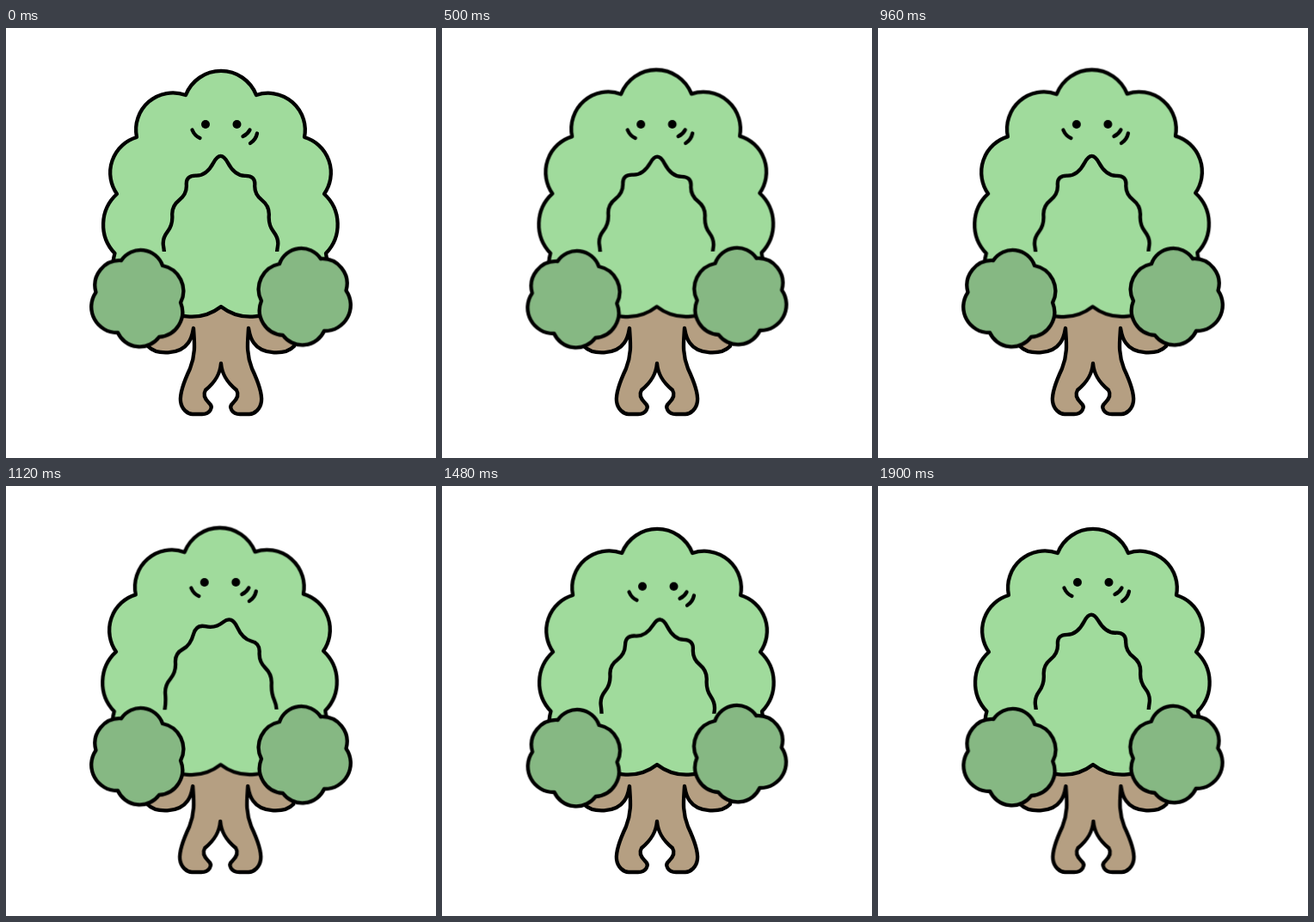
An HTML page without scripts for the animation above (1.92 s loop, 500x500 px).

```html
<!DOCTYPE html>
<html lang="en">
<head>
<meta charset="utf-8">
<title>Worried tree</title>
<style>
html, body { margin: 0; width: 100%; height: 100%; overflow: hidden; background: #fff; }
svg { display: block; width: 100vw; height: 100vh; }
.ink { stroke: #000; stroke-width: 4.3; stroke-linecap: round; stroke-linejoin: round; }
.line { fill: none; }

.trunk { fill: #b59f82; animation: lean 1920ms ease-in-out infinite; }
.crown { fill: #a0db9c; transform-origin: 250px 330px; animation: stretch 1920ms ease-in-out infinite; }
.bush { fill: #86b883; }
.head { transform-origin: 250px 435px; animation: sway 1920ms ease-in-out infinite; }
.face { animation: look 1920ms ease-in-out infinite; }
.mouth { animation: ripple 480ms linear infinite; }
.hand { animation: jiggle 40ms ease-in-out infinite alternate; }
.left { --up: -.7px; --x: .6px; --y: 1.1px; }
.right { --up: .3px; --x: -.6px; --y: -.9px; }

@keyframes jiggle {
  from { transform: translate(0, var(--up)); }
  to { transform: translate(var(--x), var(--y)); }
}
@keyframes lean {
  0%, 50% { transform: none; }
  58.3% { transform: translateX(-.8px); }
  66%, 90% { transform: none; }
  99% { transform: translateX(.4px); }
}
@keyframes stretch {
  0%, 68%, 100% { transform: scaleY(1); }
  26%, 59% { transform: scaleY(1.005); }
}
@keyframes sway {
  0% { transform: rotate(0deg); }
  26% { transform: rotate(-.13deg); }
  59.5% { transform: rotate(-.22deg); }
  68.75% { transform: rotate(1.03deg); }
  85.4% { transform: rotate(-.93deg); }
  97% { transform: rotate(-.06deg); }
  100% { transform: rotate(0deg); }
}
@keyframes look {
  0%, 59.5% { transform: translate(0, 0); }
  68.75% { transform: translate(12px, 4.5px); }
  85.4% { transform: translate(-10px, 5px); }
  97%, 100% { transform: translate(0, 0); }
}
/* every crest slides one wavelength to the right per cycle */
@keyframes ripple {
  0% { d: path("M184.5 307Q184.5 298 184.25 289T184.25 271T183 253.5T187.75 237T193.25 218T201.5 200T209.75 182.25T221 171.75T241.25 156.5T257.75 156.5T278 171.75T289.25 182.25T297.5 200T305.75 218T311.25 237T316 253.5T314.75 271"); }
  50% { d: path("M184.75 292Q185 283 184.25 273T185.75 254.75T187.5 236T194 217.75T200.25 199.25T208.75 184.75T223.25 168T239 159T260 159T275.75 168T290.25 184.75T298.75 199.25T305 217.75T311.5 236T313.25 254.75T314.75 273T314.25 292"); }
  100% { d: path("M184.25 271Q184.5 262 183 253.5T187.75 237T193.25 218T201.5 200T209.75 182.25T221 171.75T241.25 156.5T257.75 156.5T278 171.75T289.25 182.25T297.5 200T305.75 218T311.25 237T316 253.5T314.75 271T314.75 289T314.5 307"); }
}
</style>
</head>
<body>
<svg viewBox="0 0 500 500">
  <defs>
    <path id="bush" class="bush ink" d="M134 271A27 27 0 0 1 182 277A30 30 0 0 1 203 320A29 29 0 0 1 178 360A28 28 0 0 1 130 355A30 30 0 0 1 104.5 308A29 29 0 0 1 134 271Z"/>
    <clipPath id="chin"><rect x="150" y="120" width="200" height="140"/></clipPath>
  </defs>

  <path class="trunk ink" d="M250 315L160 330L165 370C175 380.5 202 380.5 212 366C217 359 217 353 218 349
    C219 365 221 378 214 396C206 413 202 425 203 434C204 443 211 449 217 449L228 449
    C237 449 242 441 236 436C231 431 229 426 232 421C244 411 249 402 250 390
    C251 402 256 411 268 421C271 426 269 431 264 436C258 441 263 449 272 449L283 449
    C289 449 296 443 297 434C298 425 294 413 286 396C279 378 281 365 282 349
    C283 353 283 359 288 366C298 380.5 325 380.5 335 370L340 330Z"/>

  <g class="head">
    <path class="crown ink" d="M250 324A56 56 0 0 1 174 317A43 43 0 0 1 126.5 262A48 48 0 0 1 129 193
      A43 43 0 0 1 152 127A43 43 0 0 1 209 78A44 44 0 0 1 291 78A43 43 0 0 1 347 127
      A43 43 0 0 1 370 193A48 48 0 0 1 372 262A46 46 0 0 1 326 317A56 56 0 0 1 250 324Z"/>
    <g class="face">
      <circle cx="232" cy="112" r="5"/>
      <circle cx="268.5" cy="112" r="5"/>
      <path class="line ink" d="M216.5 118.5Q219.5 125.5 225.5 128M283.5 118.5Q281 123.5 275.5 126M292 122.5Q290.5 130 284 134"/>
      <g clip-path="url(#chin)">
        <path class="mouth line ink" d="M184.5 307Q184.5 298 184.25 289T184.25 271T183 253.5T187.75 237T193.25 218T201.5 200T209.75 182.25T221 171.75T241.25 156.5T257.75 156.5T278 171.75T289.25 182.25T297.5 200T305.75 218T311.25 237T316 253.5T314.75 271"/>
      </g>
    </g>
  </g>

  <g class="hand left"><use href="#bush"/></g>
  <g class="hand right"><use href="#bush" transform="translate(500 -3) scale(-1 1)"/></g>
</svg>
</body>
</html>
```
